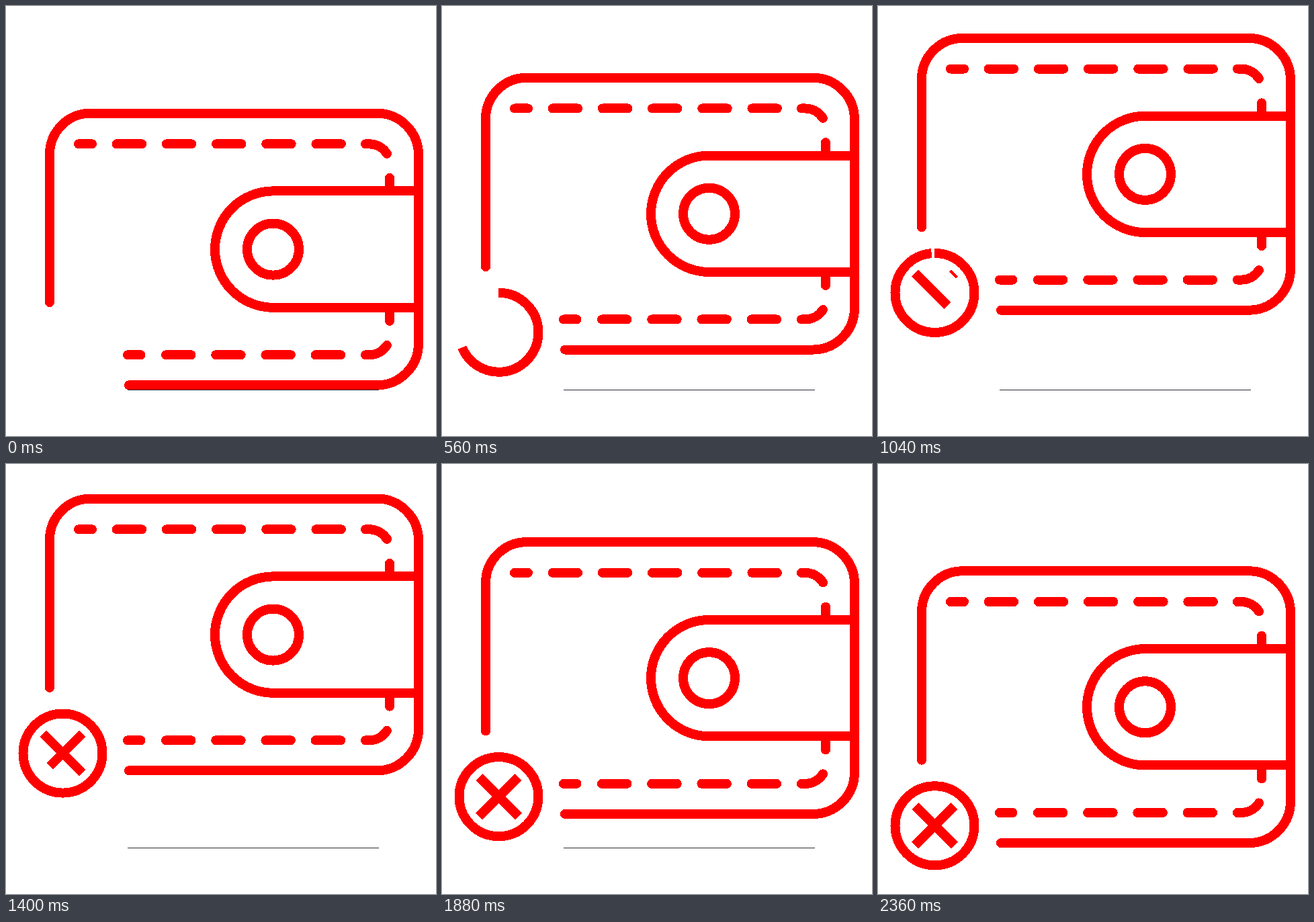
Animation, 640 px wide and 640 px high, one loop 2400 ms. Source, as an HTML page:

```html
<!DOCTYPE html>
<html lang="en">
<head>
<meta charset="utf-8">
<title>Wallet</title>
<style>
html, body { margin: 0; width: 100%; height: 100%; overflow: hidden; background: #fff; }
svg { display: block; width: 100%; height: 100%; }
#art { fill: none; stroke: #f00; stroke-width: 14; }
.round { stroke-linecap: round; }
</style>
</head>
<body>
<svg viewBox="0 0 640 640" shape-rendering="crispEdges">
  <rect id="rule" x="181" y="571" width="374" height="1" fill="#2d2d37"/>
  <g id="art">
    <g class="round">
      <path d="M65 441V220.6A61 61 0 0 1 126 159.6H552A62 62 0 0 1 614 221.6V502.4A62 62 0 0 1 552 564.4H183"/>
      <path id="stitches"/>
      <path d="M535 205.3H540A31.5 31.5 0 0 1 567 219.8M571 256V275M571 449V468.8M567 504.8A31.5 31.5 0 0 1 540 519.3H535"/>
    </g>
    <path d="M614 275.4H397.7A86.7 86.7 0 0 0 397.7 448.8H614"/>
    <circle cx="397.5" cy="362.1" r="38.5"/>
    <path id="ring" pathLength="1" d="M84.5 479.6a59 59 0 0 1 0 118a59 59 0 0 1 0 -118"/>
    <path id="down" pathLength="1" d="M55.2 509.3l58.6 58.6"/>
    <path id="up" pathLength="1" d="M113.8 509.3l-58.6 58.6"/>
  </g>
</svg>
<script>
const LOOP = 2400, HALF = LOOP / 2, STEP = 40, RISE = 117.4;
const $ = id => document.getElementById(id);

// A row of stitches: one short, then long ones at an even pitch
const row = (y, x1, x2, first, count) => {
  let d = `M${x1} ${y}H${x2}`;
  for (let i = 0; i < count; i++) d += `M${first + i * 74.2} ${y}h37.5`;
  return d;
};
$("stitches").setAttribute("d", row(205.3, 108, 128, 164.6, 5) + row(519.3, 181, 200.5, 238, 4));

// cubic-bezier(x1, 0, x2, 1)
const ease = (x, x1 = 1 / 3, x2 = 2 / 3) => {
  if (x <= 0) return 0;
  if (x >= 1) return 1;
  let lo = 0, hi = 1;
  for (let i = 0; i < 24; i++) {
    const s = (lo + hi) / 2, r = 1 - s;
    if (3 * x1 * s * r * r + 3 * x2 * s * s * r + s * s * s < x) lo = s; else hi = s;
  }
  return lo * lo * (3 - 2 * lo);
};

const trims = [
  { el: $("ring"), start: 0, span: 1200, x2: 0.3 },
  { el: $("down"), start: 600, span: 600 },
  { el: $("up"), start: 960, span: 600 }
];

function draw(t) {
  const lift = t < HALF ? ease(t / HALF) : 1 - ease(t / HALF - 1, 0.323, 0.625);
  $("art").setAttribute("transform", `translate(0 ${(-RISE * lift).toFixed(3)})`);
  for (const { el, start, span, x2 } of trims) {
    const p = ease((t - start) / span, 1 / 3, x2);
    el.style.visibility = p > 0 ? "visible" : "hidden";
    el.setAttribute("stroke-dasharray", p < 1 ? `${p} 2` : "none");
  }
  $("rule").style.visibility = t < 1960 ? "visible" : "hidden";
}

const t0 = performance.now();
function tick() {
  const t = (performance.now() - t0) % LOOP;
  draw(Math.floor(t / STEP) * STEP);
  requestAnimationFrame(tick);
}
draw(0);
requestAnimationFrame(tick);
</script>
</body>
</html>
```
